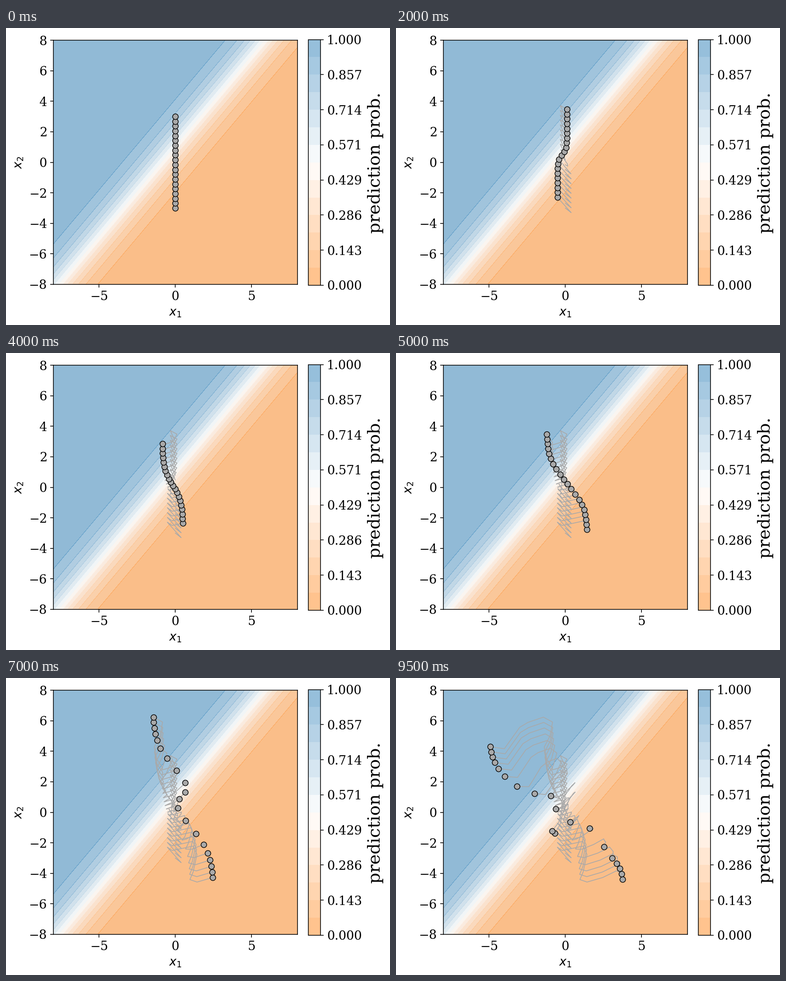
A matplotlib script that plays this animation: 851 px wide and 658 px high, repeating every 10000 ms.

```python
import numpy as np
import matplotlib.pyplot as plt
from matplotlib.animation import FuncAnimation
from matplotlib.colors import LinearSegmentedColormap

W, H, N = 851, 658, 20
PT = 1.4      # point scale of the type and line weights
UNIT = 33.83  # pixels per data unit

plt.rcParams.update({
    "font.family": "DejaVu Serif", "font.size": 14 * PT,
    "axes.linewidth": 0.8 * PT,
    "xtick.major.size": 3.5 * PT, "ytick.major.size": 3.5 * PT,
    "xtick.major.width": 0.8 * PT, "ytick.major.width": 0.8 * PT,
    "xtick.major.pad": 3.5 * PT, "ytick.major.pad": 3.5 * PT,
})

# Key points of the chain's two ends: step, bottom x, y, top x, y in pixels
ENDS = np.array([
    (0, 375.2, 399, 375.2, 196.2),
    (2, 388, 409, 364, 172),
    (4, 357.5, 375, 379, 180),
    (6, 366, 381, 369, 197),
    (7, 369, 382, 346, 204),
    (9, 415.5, 372, 346, 199),
    (10, 424.5, 391, 333, 180),
    (11, 416, 431, 327.5, 152),
    (12, 408.5, 448.5, 340.5, 127),
    (13, 424.5, 454.5, 346, 96),
    (14, 460, 444.5, 325, 85),
    (15, 492, 429, 290, 97),
    (16, 497.5, 432.5, 271.5, 108),
    (18, 506, 432, 237, 156),
    (19, 506.5, 447, 205.5, 151.5),
])


def chain(step):
    """Points of the chain: both halves follow their end, the middle folds."""
    i = np.arange(N)
    ends = np.array([np.interp(step, ENDS[:, 0], c) for c in ENDS[:, 1:].T])
    low, high = (ends - ENDS[0, 1:]).reshape(2, 2)

    width = 2.2 * np.clip(step / 8, 0.1, 1) ** 1.5
    share = 1 / (1 + np.exp(-(i - 9.2) / width))[:, None]
    shift = low * (1 - share) + high * share

    u = (i - 9.4) / 1.7
    fold = 46 / (1 + np.exp((13.2 - step) / 1.2)) * u * np.exp((1 - u * u) / 2)
    v = i - 8.55
    wave = 48 * max(0, step - 16) / 3 * np.cos(1.21 * v) * np.exp(-(v / 3) ** 2)
    shift += np.column_stack([fold, 0.45 * fold + wave])

    column = np.column_stack([np.zeros(N), np.linspace(-3, 3, N)])
    return column + shift * [1, -1] / UNIT


def box(left, top, right, bottom):
    return [left / W, 1 - bottom / H, (right - left) / W, (bottom - top) / H]


def label(x, y, text, size, rotation=0):
    fig.text(x / W, 1 - y / H, text, fontsize=size * PT, rotation=rotation,
             rotation_mode="anchor", ha="center", va="baseline")


fig = plt.figure(figsize=(W / 100, H / 100), dpi=100, facecolor="white")
ax = fig.add_axes(box(104.5, 27, 646, 568), facecolor="#f5f5f5")
cax = fig.add_axes(box(669.5, 25.5, 697.3, 570))

grid = np.linspace(-8, 8, 241)
gx, gy = np.meshgrid(grid, grid)
prob = 1 / (1 + np.exp(-(gy - 1.187 * gx - 1.08) / 1.187))
levels = np.linspace(0, 1, 15)
cmap = LinearSegmentedColormap.from_list("prob", ["#ff7f0e", "white", "#1f77b4"])
bands = ax.contourf(gx, gy, prob, levels=levels, cmap=cmap, alpha=0.5)
fig.colorbar(bands, cax=cax, ticks=levels[::2], format="%.3f")

ax.set(xlim=(-8, 8), ylim=(-8, 8), xticks=[-5, 0, 5], yticks=range(-8, 9, 2))
label(375.2, 637.5, "$x_1$", 13.7)
label(35.5, 297.5, "$x_2$", 13.7, 90)
label(829, 298.5, "prediction prob.", 19.6, 90)

paths = np.array([chain(step) for step in range(N)])
trails = [ax.plot([], [], color="darkgray", lw=0.85 * PT, zorder=3)[0] for _ in range(N)]
dots, = ax.plot([], [], "o", ms=6.4 * PT, mfc="darkgray", mec="black",
                mew=0.75 * PT, zorder=4)


def update(step):
    for i, trail in enumerate(trails):
        trail.set_data(*paths[:step + 1, i].T)
    dots.set_data(*paths[step].T)
    return [*trails, dots]


anim = FuncAnimation(fig, update, frames=N, interval=500, repeat=True,
                     repeat_delay=0, blit=False)
plt.show()
```
